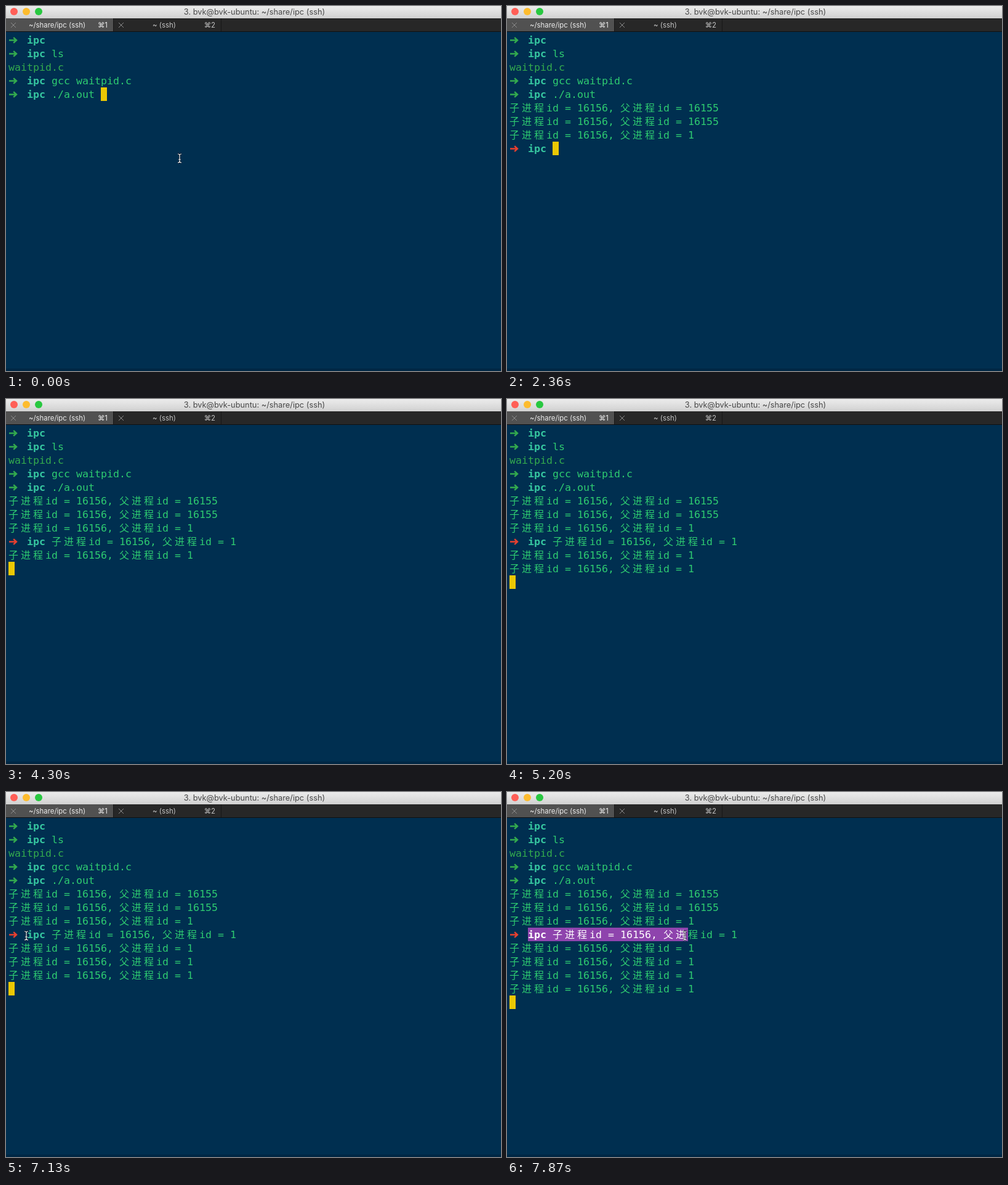
Recreate the animation shown at these times as an HTML page with a canvas. Size 804x592 px, loop 8000 ms.

```html
<!DOCTYPE html>
<html lang="zh">
<head>
<meta charset="utf-8">
<title>waitpid</title>
<style>
  html, body { margin: 0; width: 100%; height: 100%; overflow: hidden; background: #002f50; }
  canvas { display: block; }
</style>
</head>
<body>
<canvas id="stage" width="804" height="592"></canvas>
<script>
const ctx = document.getElementById('stage').getContext('2d');
const LOOP = 8000;
const CELL = 10, ROW = 22, LEFT = 4, TOP = 44;

const MONO = '"DejaVu Sans Mono", "Noto Sans CJK SC", monospace';
const CJK = '"Noto Sans CJK SC", "Noto Sans CJK", sans-serif';
const UI = 'Inter, "DejaVu Sans", sans-serif';

const GREEN = '#2ecc71', ARROW = '#33ab4e', TEAL = '#36c6a0', RED = '#e9402f';
const START = 290, EXIT = 2360, RESUME = 3260;

// Times at which the child process prints a line
const PRINTS = [START, 1320, 2210, RESUME, 4300, 5200, 6240, 7280];

// Pointer: time, x, y; a missing position hides it
const POINTER = [
  [0, 282, 247], [740, 300, 243], [890, 370, 222], [1030, 490, 180],
  [1180, 605, 150], [1320, 696, 143], [1620],
  [5800, 741, 60], [5950, 640, 8], [6090, 450, 70], [6240, 289, 152],
  [6390, 200, 200], [6540, 130, 228], [6680, 80, 236], [6830, 50, 236],
  [6980, 40, 234], [7130, 33, 233], [7280, 40, 233], [7420, 95, 233],
  [7570, 175, 233], [7720, 250, 233], [7870, 289, 233]
];
const SELECT_FROM = 7280, SELECT_ROW = 8, SELECT_COL = 3;

function rect(x, y, w, h, color) {
  ctx.fillStyle = color;
  ctx.fillRect(x, y, w, h);
}

function label(text, x, y, size, color, align = 'center') {
  ctx.font = `${size}px ${UI}`;
  ctx.fillStyle = color;
  ctx.textAlign = align;
  ctx.fillText(text, x, y);
}

// Writes text on the cell grid; wide characters take two cells
function write(text, row, col, color, bold = false) {
  ctx.fillStyle = color;
  ctx.textAlign = 'left';
  for (const ch of text) {
    const wide = ch > '\u2fff';
    ctx.font = wide ? `16px ${CJK}` : `${bold ? 'bold ' : ''}16.6px ${MONO}`;
    ctx.fillText(ch, LEFT + col * CELL, TOP + row * ROW + 17);
    col += wide ? 2 : 1;
  }
}

function arrow(row, color) {
  const y = TOP + row * ROW + 11.5;
  ctx.strokeStyle = color;
  ctx.lineWidth = 2.4;
  ctx.beginPath();
  ctx.moveTo(5, y);
  ctx.lineTo(16, y);
  ctx.moveTo(12.2, y - 4.4);
  ctx.lineTo(17, y);
  ctx.lineTo(12.2, y + 4.4);
  ctx.stroke();
}

function prompt(row, command, color = ARROW) {
  arrow(row, color);
  write('ipc', row, 3, TEAL, true);
  write(command, row, 7, GREEN);
}

function cross(x, y) {
  ctx.strokeStyle = '#8c8c8c';
  ctx.lineWidth = 1;
  ctx.beginPath();
  ctx.moveTo(x - 4, y - 4);
  ctx.lineTo(x + 4, y + 4);
  ctx.moveTo(x + 4, y - 4);
  ctx.lineTo(x - 4, y + 4);
  ctx.stroke();
}

function drawWindow(running) {
  const bar = ctx.createLinearGradient(0, 0, 0, 20);
  bar.addColorStop(0, '#ececec');
  bar.addColorStop(1, '#d1d1d1');
  rect(0, 0, 804, 20, bar);
  ['#ff5f57', '#fdbc2e', '#28c840'].forEach((color, i) => {
    ctx.fillStyle = color;
    ctx.beginPath();
    ctx.arc(13 + 20 * i, 9, 6, 0, 2 * Math.PI);
    ctx.fill();
  });
  const title = running ? './a.out' : 'bvk@bvk-ubuntu: ~/share/ipc';
  label(`3. ${title} (ssh)`, 403.5, 14, 12.8, '#474747');

  rect(0, 20, 804, 22, '#272727');
  rect(0, 20, 174, 21, '#515151');
  rect(174, 20, 1, 21, '#171717');
  rect(349, 20, 1, 21, '#171717');
  rect(0, 41, 804, 1, '#101010');
  cross(12, 31);
  cross(187, 31);
  label(`${running ? './a.out' : '~/share/ipc'} (ssh)`, 83, 35, 11.4, '#ededed');
  label('⌘1', 165, 35, 11.4, '#ededed', 'right');
  label('~ (ssh)', 257, 35, 11.4, '#c4c4c4');
  label('⌘2', 340, 35, 11.4, '#c4c4c4', 'right');
}

function output(n) {
  return `子进程id = 16156, 父进程id = ${n < 2 ? 16155 : 1}`;
}

function drawTerminal(t) {
  const count = PRINTS.filter(p => t >= p).length;
  rect(0, 42, 804, 546, '#002f50');
  rect(0, 588, 804, 4, '#002744');
  prompt(0, '');
  prompt(1, 'ls');
  write('waitpid.c', 2, 0, ARROW);
  prompt(3, 'gcc waitpid.c');
  prompt(4, './a.out');
  for (let n = 0; n < count; n++) {
    if (n !== 3) write(output(n), 5 + n, 0, GREEN);
  }
  if (t >= EXIT) prompt(8, count > 3 ? output(3) : '', RED);

  const waiting = t >= EXIT && t < RESUME;
  const col = t < START ? 15 : waiting ? 7 : 0;
  const row = t < START ? 4 : 5 + count;
  rect(LEFT + col * CELL, TOP + row * ROW, CELL, ROW, '#ecc803');
}

function drawSelection(x) {
  const end = Math.round((x - LEFT) / CELL);
  const left = LEFT + SELECT_COL * CELL;
  const top = TOP + SELECT_ROW * ROW;
  const width = (end - SELECT_COL) * CELL;
  ctx.save();
  ctx.beginPath();
  ctx.rect(left, top, width, ROW);
  ctx.clip();
  rect(left, top, width, ROW, '#8e44ad');
  write('ipc', SELECT_ROW, 3, '#fff', true);
  write(output(3), SELECT_ROW, 7, '#fff');
  ctx.restore();
}

function drawPointer(x, y) {
  ctx.beginPath();
  for (const s of [-1, 1]) {
    ctx.moveTo(x - 3, y + 7 * s);
    ctx.quadraticCurveTo(x, y + 7 * s, x, y + 5 * s);
    ctx.quadraticCurveTo(x, y + 7 * s, x + 3, y + 7 * s);
  }
  ctx.moveTo(x, y - 5);
  ctx.lineTo(x, y + 5);
  ctx.moveTo(x - 1.8, y + 2);
  ctx.lineTo(x + 1.8, y + 2);
  ctx.strokeStyle = 'rgba(0, 12, 24, 0.75)';
  ctx.lineWidth = 2.8;
  ctx.stroke();
  ctx.strokeStyle = '#f4f4f4';
  ctx.lineWidth = 1.2;
  ctx.stroke();
}

function draw(t) {
  const [, x, y] = POINTER.filter(p => t >= p[0]).pop();
  drawWindow(t >= START && t < EXIT);
  drawTerminal(t);
  if (t >= SELECT_FROM) drawSelection(x);
  if (x !== undefined) drawPointer(x, y);
}

const begin = performance.now();
function tick() {
  draw((performance.now() - begin) % LOOP);
  requestAnimationFrame(tick);
}
tick();
</script>
</body>
</html>
```
